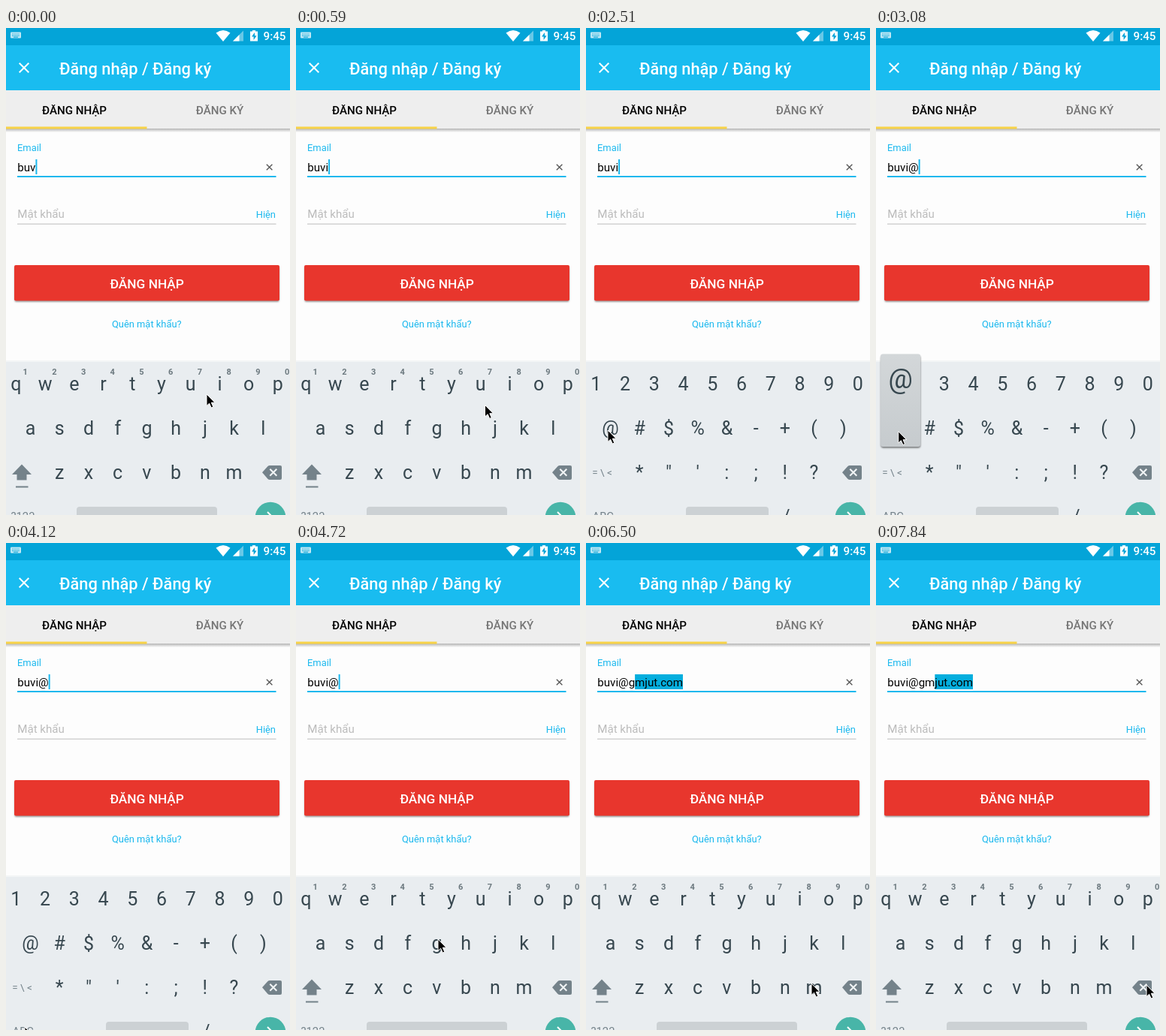
An HTML page that plays this animation: 378 px wide and 649 px high, repeating every 7.99 s.

```html
<!DOCTYPE html>
<html lang="vi">
<head>
<meta charset="utf-8">
<title>Đăng nhập</title>
<style>
  html, body { margin: 0; width: 100%; height: 100%; overflow: hidden; background: #fdfdfd; }
  svg { display: block; width: 378px; height: 649px; font-family: Roboto, sans-serif; }
  text { white-space: pre; }
  .mid { text-anchor: middle; }
  .med { font-weight: 500; }
  .key { font-size: 25px; fill: #37474f; text-anchor: middle; }
  .hint { font-size: 11px; font-weight: 700; fill: #6c797f; text-anchor: middle; }
  .fn { fill: #74828a; }
  .link { font-size: 12.9px; fill: #1ab8ee; }
</style>
</head>
<body>
<svg viewBox="0 0 378 649">
  <defs>
    <linearGradient id="drop" x2="0" y2="1">
      <stop stop-color="#b4b4b4"/><stop offset="1" stop-color="#fdfdfd"/>
    </linearGradient>
    <linearGradient id="pop" x2="0" y2="1">
      <stop stop-color="#d3d7d9"/><stop offset="1" stop-color="#c6cbce"/>
    </linearGradient>
    <filter id="soft" x="-20%" y="-20%" width="140%" height="140%"><feGaussianBlur stdDeviation="1.2"/></filter>
  </defs>
  <rect width="378" height="649" fill="#fdfdfd"/>

  <!-- status bar and title -->
  <rect width="378" height="23" fill="#04a4d8"/>
  <rect y="23" width="378" height="60" fill="#19bcf0"/>
  <rect x="6" y="5.500" width="14" height="8" rx="1" fill="#fff" opacity=".75"/>
  <path d="M8 8h10M8 10.300h10" stroke="#04a4d8" stroke-width="1.200" stroke-dasharray="1.200 .9"/>
  <path d="M10 12.200h6" stroke="#04a4d8"/>
  <path d="M279.500 6.500Q289 -.5 298.500 6.500L289 18Z" fill="#fff"/>
  <path d="M316 3.500V17.500H302Z" fill="#fff" opacity=".4"/>
  <path d="M310.500 9V17.500H302Z" fill="#fff"/>
  <path d="M325 4.500h3V3h4v1.500h3V17.500H325Z" fill="#fff"/>
  <path d="M331 6l-4 5.500h2.600V16l4-5.700H331Z" fill="#04a4d8"/>
  <text class="med" x="342.500" y="16" font-size="15.200" fill="#fff">9:45</text>
  <path d="M17.700 46.700l12.600 12.600M30.300 46.700L17.700 59.300" stroke="#fff" stroke-width="2"/>
  <text class="med" x="71" y="61.500" font-size="21.800" fill="#fff">Đăng nhập / Đăng ký</text>

  <!-- tabs -->
  <rect y="83" width="378" height="51" fill="#eee"/>
  <rect y="134" width="378" height="5" fill="url(#drop)"/>
  <rect y="131.500" width="187.500" height="3" fill="#f8d348"/>
  <g class="mid med" font-size="15.100">
    <text x="91" y="115">ĐĂNG NHẬP</text>
    <text x="284.500" y="115" fill="#757575">ĐĂNG KÝ</text>
  </g>

  <!-- form -->
  <text class="link" x="15" y="164">Email</text>
  <rect id="sel" y="175" height="20" fill="#04aede"/>
  <text id="mail" x="15.300" y="190.500" font-size="15.100"></text>
  <rect id="caret" y="175" width="2" height="20" fill="#1ab8ee"/>
  <path d="M346.800 181.700l7.600 7.600M354.400 181.700l-7.600 7.600" stroke="#555" stroke-width="1.300"/>
  <rect x="15" y="197" width="344.500" height="2" fill="#1ab8ee"/>
  <text x="15.300" y="253" font-size="15.100" fill="#bcbcbc">Mật khẩu</text>
  <text class="link" x="359" y="253" text-anchor="end">Hiện</text>
  <rect x="15" y="260.500" width="344.500" height="1.500" fill="#d2d2d2"/>
  <rect x="11.500" y="318" width="352" height="47" rx="2" fill="#000" opacity=".4" filter="url(#soft)"/>
  <rect x="11" y="316" width="353" height="47.500" rx="2" fill="#e8362d"/>
  <text class="mid med" x="187.700" y="346.500" font-size="17.300" fill="#fff">ĐĂNG NHẬP</text>
  <text class="link mid" x="187.300" y="399">Quên mật khẩu?</text>

  <!-- keyboard -->
  <rect y="443.500" width="378" height="206" fill="#e9edf0"/>
  <rect y="443.500" width="378" height="1.500" fill="#f3f5f6"/>
  <g id="abc">
    <path class="fn" d="M21 581.500L34 595H27.500V602.500H14.500V595H8Z"/>
    <rect class="fn" x="13" y="610.500" width="16.500" height="2"/>
    <text class="fn" x="6.500" y="655.500" font-size="14.800">?123</text>
    <rect x="94" y="638" width="187" height="30" rx="4" fill="#ccd1d4"/>
  </g>
  <g id="sym">
    <text class="fn mid" x="21.500" y="597" font-size="13.500">= \ &lt;</text>
    <text class="fn" x="8.500" y="655.500" font-size="14.800">ABC</text>
    <rect x="133" y="638" width="110" height="30" rx="4" fill="#ccd1d4"/>
    <text class="key" x="266.500" y="660">/</text>
  </g>
  <path class="fn" d="M341 592.300L348.500 584Q349.500 583 351 583H365Q367 583 367 585V600Q367 602 365 602H351Q349.500 602 348.500 601Z"/>
  <path d="M351.300 587.800l9 9M360.300 587.800l-9 9" stroke="#f2f5f6" stroke-width="2"/>
  <circle cx="352" cy="652" r="20.300" fill="#48b5a8"/>
  <path d="M348 645l6.500 6.500-6.500 6.500" fill="none" stroke="#fff" stroke-width="2"/>

  <g id="popup">
    <rect x="-26" y="2" width="52.500" height="123" rx="3" fill="#000" opacity=".55" filter="url(#soft)"/>
    <rect x="-26.500" width="53" height="123.500" rx="3" fill="url(#pop)"/>
    <text id="big" class="mid" y="45" font-size="36" fill="#37474f"></text>
  </g>
  <path id="mouse" d="M0 0V15.500L3.600 12.200L6.200 18L8.800 16.900L6.300 11.200H11Z" fill="#000" stroke="#fff" stroke-width="1"/>
</svg>
<script>
const LOOP = 7990, TICK = 147.5, PITCH = 38.72;
const ROWS = [482.5, 541.5, 600.5];
const $ = id => document.getElementById(id);

function label(parent, cls, x, y, s) {
  const el = document.createElementNS('http://www.w3.org/2000/svg', 'text');
  el.setAttribute('class', cls);
  el.setAttribute('x', x);
  el.setAttribute('y', y);
  el.textContent = s;
  parent.append(el);
}

const keyX = (row, i) => [13.4, 32.6, 71.2][row] + i * PITCH;

function layout(parent, rows) {
  rows.forEach((keys, r) => [...keys].forEach((c, i) => label(parent, 'key', keyX(r, i), ROWS[r], c)));
}

layout($('abc'), ['qwertyuiop', 'asdfghjkl', 'zxcvbnm']);
layout($('sym'), ['1234567890', '@#$%&-+()', '*"\':;!?']);
[...'1234567890'].forEach((c, i) => label($('abc'), 'hint', keyX(0, i) + 12.2, 461.5, c));

// All tables below count in ticks.
const MAIL = 'buvi@gmjut.com';
const TYPED = [[0, 3, -100], [3, 4, 400], [19, 5, 2700], [39, 6], [46, 7]]; // tick, letters, caret reset in ms
const POPUPS = [[2, 4, 'i', 0, 7], [18, 21, '@', 1, 0], [38, 40, 'g', 1, 4], [45, 47, 'm', 2, 6]];
const SYMBOLS = [11, 29];
const PATH = [
  [0, 267, 488], [2, 284, 476], [3, 283, 477], [5, 220, 528], [7, 58, 624], [8, 26, 632],
  [9, 29, 620], [10, 25, 636], [11, 24, 640], [15, 30, 548], [17, 29, 536], [21, 30, 538],
  [24, 28, 604], [26, 23, 638], [28, 25, 645], [29, 25, 644], [32, 189, 528], [34, 186, 535],
  [41, 186, 535], [44, 300, 587], [48, 299, 586], [49, 295, 582], [50, 306, 585],
  [52, 366, 589], [53, 360, 589]
];

function mouseAt(k) {
  const j = Math.max(1, PATH.findIndex(p => p[0] >= k));
  const [a, x0, y0] = PATH[j - 1], [b, x1, y1] = PATH[j];
  const f = (k - a) / (b - a);
  return [x0 + (x1 - x0) * f, y0 + (y1 - y0) * f];
}

const show = (id, on) => $(id).setAttribute('visibility', on ? 'visible' : 'hidden');
const move = (id, x, y) => $(id).setAttribute('transform', `translate(${x} ${y})`);

function draw(k) {
  const [, n, reset] = TYPED.filter(s => s[0] <= k).pop();
  const picked = n > 5, mail = $('mail');
  mail.textContent = picked ? MAIL : MAIL.slice(0, n);
  const end = 15.3 + mail.getSubStringLength(0, n);
  $('sel').setAttribute('x', end);
  $('sel').setAttribute('width', Math.max(0, 15.3 + mail.getComputedTextLength() - end));
  $('caret').setAttribute('x', end);
  show('sel', picked);
  show('caret', !picked && Math.floor((k * TICK - reset) / 500) % 2 === 0);

  const sym = k >= SYMBOLS[0] && k < SYMBOLS[1];
  show('sym', sym);
  show('abc', !sym);

  const pop = POPUPS.find(p => k >= p[0] && k < p[1]);
  show('popup', pop);
  if (pop) {
    const [, , c, row, i] = pop;
    $('big').textContent = c;
    move('popup', keyX(row, i), ROWS[row] - 107);
  }
  move('mouse', ...mouseAt(k));
}

const start = performance.now();
let last = -1;
function frame() {
  const t = Math.max(0, performance.now() - start) % LOOP;
  const k = Math.min(53, Math.floor((t + 10) / TICK));
  if (k !== last) draw(last = k);
  requestAnimationFrame(frame);
}
frame();
</script>
</body>
</html>
```
